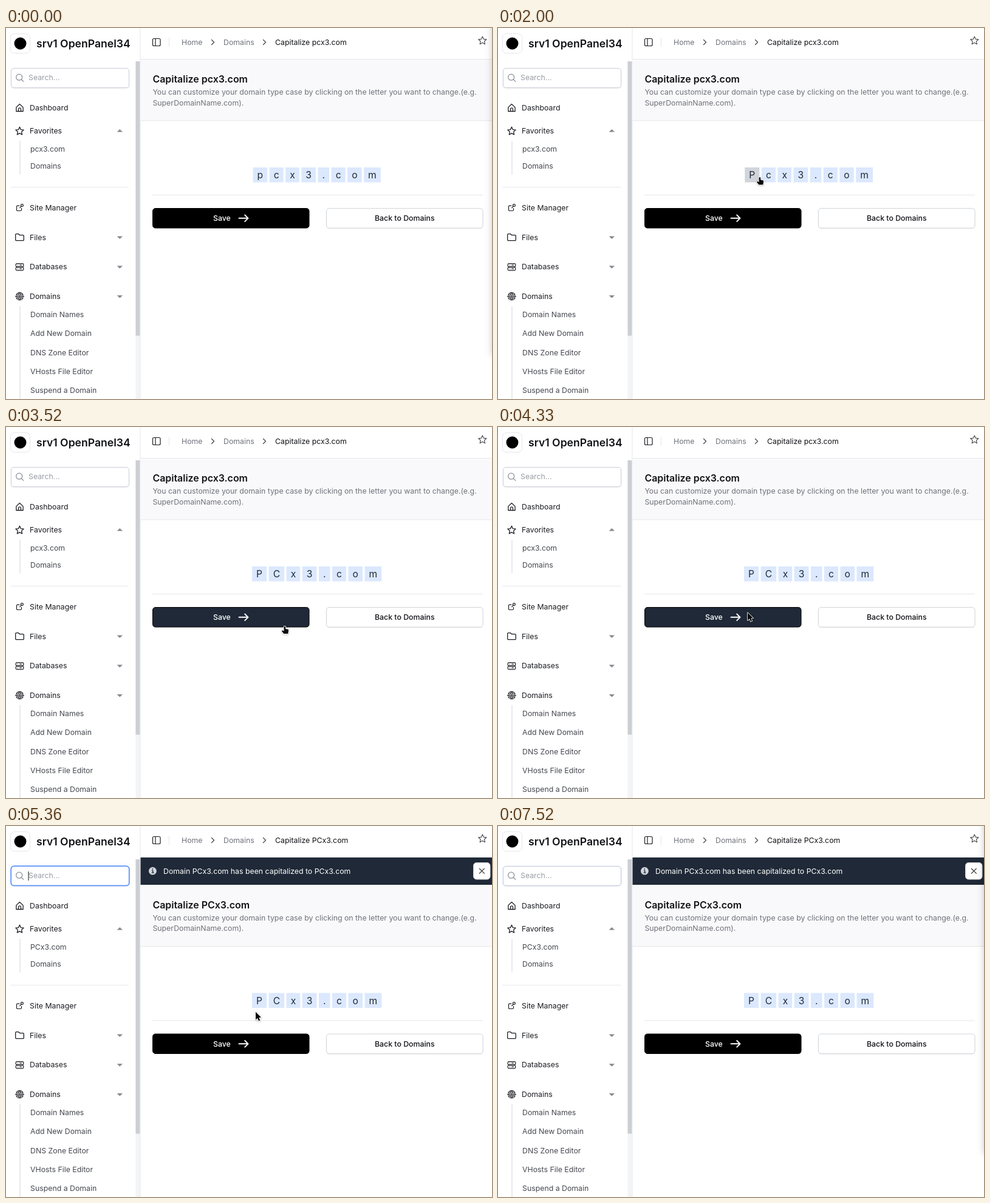
An HTML page with a canvas that plays this animation: 800x612 px, repeating every 7.55 s.

```html
<!DOCTYPE html>
<html lang="en">
<head>
<meta charset="utf-8">
<title>Capitalize domain</title>
<style>
html, body { margin: 0; width: 100%; height: 100%; overflow: hidden; background: #fff; }
canvas { display: block; width: 800px; height: 612px; }
</style>
</head>
<body>
<canvas id="stage"></canvas>
<script>
const LOOP = 7550, SAVED = 4910;
const INK = '#1f2937', DARK = '#1c1d22', SOFT = '#46484f', MUTED = '#6f727b', LINE = '#e5e7eb', EDGE = '#d1d5db';
const canvas = document.getElementById('stage');
const ctx = canvas.getContext('2d');
const ratio = window.devicePixelRatio || 1;
canvas.width = 800 * ratio;
canvas.height = 612 * ratio;

// cursor path: time, x, y
const PATH = [
  [30, 768, 585], [330, 690, 455], [640, 608, 345], [700, 575, 292], [790, 538, 279],
  [1030, 426, 269], [1260, 425, 256], [1500, 431, 246], [2060, 431, 246], [2210, 444, 246],
  [2450, 444, 246], [2700, 485, 278], [2910, 514, 313], [3120, 518, 367], [3220, 514, 369],
  [3500, 462, 330], [3850, 411, 306], [5660, 411, 307], [6100, 480, 306], [6420, 594, 305], [6670, 800, 303]
];

const clamp = v => Math.max(0, Math.min(1, v));
const ramp = (t, a, b) => clamp((t - a) / (b - a));

function cursorAt(t) {
  if (t < 30 || t >= 6670) return null;
  const i = PATH.findIndex(p => p[0] > t);
  const [t0, x0, y0] = PATH[i - 1], [t1, x1, y1] = PATH[i];
  const k = (t - t0) / (t1 - t0);
  return [x0 + (x1 - x0) * k, y0 + (y1 - y0) * k];
}

function text(s, x, y, color = DARK, size = 12.32, weight = 400) {
  ctx.font = `${weight} ${size}px Inter, sans-serif`;
  ctx.fillStyle = color;
  ctx.fillText(s, x, y);
}

function rect(x, y, w, h, color) {
  ctx.fillStyle = color;
  ctx.fillRect(x, y, w, h);
}

function box(x, y, w, h, r, fill, stroke, width = 1) {
  ctx.beginPath();
  ctx.roundRect(x, y, w, h, r);
  if (fill) { ctx.fillStyle = fill; ctx.fill(); }
  if (stroke) { ctx.strokeStyle = stroke; ctx.lineWidth = width; ctx.stroke(); }
}

function softBox(x, y, w, h, stroke) {
  ctx.save();
  ctx.shadowColor = 'rgba(0,0,0,.1)';
  ctx.shadowBlur = 2 * ratio;
  ctx.shadowOffsetY = ratio;
  box(x, y, w, h, 4.5, '#fff');
  ctx.restore();
  box(x, y, w, h, 4.5, '#fff', stroke);
}

function icon(d, x, y, color = DARK, width = 1.3, fill = false, scale = 1) {
  const p = new Path2D(d);
  ctx.save();
  ctx.translate(x, y);
  ctx.scale(scale, scale);
  ctx.lineWidth = width;
  ctx.lineCap = ctx.lineJoin = 'round';
  ctx.strokeStyle = ctx.fillStyle = color;
  if (fill) ctx.fill(p); else ctx.stroke(p);
  ctx.restore();
}

function starPath(r, inner) {
  let d = '';
  for (let i = 0; i < 10; i++) {
    const a = i * Math.PI / 5 - Math.PI / 2, q = i % 2 ? inner : r;
    d += (i ? 'L' : 'M') + q * Math.cos(a) + ' ' + q * Math.sin(a);
  }
  return d + 'Z';
}
const STAR = starPath(7, 3.3);
const ring = r => `M${-r} 0A${r} ${r} 0 1 1 ${r} 0A${r} ${r} 0 1 1 ${-r} 0Z`;
const DOWN = 'M-4.7 -2L4.7 -2L0 2.4Z', UP = 'M-4.7 2L4.7 2L0 -2.4Z';

function search(t) {
  const focus = t < SAVED ? 0 : 1 - ramp(t, 7400, 7530);
  softBox(8.5, 66.5, 194, 32, '#c9ced6');
  if (focus) {
    ctx.globalAlpha = focus;
    box(8.2, 66.2, 194.6, 32.2, 5, null, '#5b93f7', 1.8);
    ctx.globalAlpha = 1;
  }
  icon(ring(5), 21.7, 81.2, '#8f929b', 1.3);
  icon('M0 0L3.6 3.6', 25.3, 84.8, '#8f929b', 1.3);
  text('Search...', 37, 86.3, '#9a9da5');
  const caretOn = t < 5440 || (t >= 6040 && t < 6640) || t >= 7240;
  if (focus > 0.5 && caretOn) rect(36.5, 75, 1, 15, '#111');
}

function sidebar(t, name) {
  rect(213.5, 55, 7, 557, '#f3f4f6');
  rect(213.5, 55, 7, 452.5, '#cbced3');
  rect(220.5, 0, 1, 612, LINE);
  box(7.5, 9.5, 32, 32, 6, '#fff', LINE);
  icon(ring(10), 23.5, 25.5, '#000', 1, true);
  text('srv1 OpenPanel34', 50, 31.5, '#111216', 17.6, 600);
  search(t);

  text('Dashboard', 39, 136);
  icon('M-5.6 -.6L0 -6L5.6 -.6V6H-5.6ZM-2 6V2.4Q-2 .4 0 .4Q2 .4 2 2.4V6', 22.5, 131.5);
  text('Favorites', 39, 174.3);
  icon(STAR, 22.5, 170.3);
  icon(UP, 187.3, 169.5, '#858891', 1, true);
  rect(22.5, 186, 1, 55.5, EDGE);
  text(name, 40, 204, SOFT);
  text('Domains', 40, 231.8, SOFT);
  rect(8, 262, 194, 1, LINE);

  text('Site Manager', 39, 300.6);
  icon('M-.5 -3.2H-3.5Q-5 -3.2 -5 -1.7V3.7Q-5 5.2 -3.5 5.2H1.5Q3 5.2 3 3.7V1M.3 .2L2.8 -2.2', 22.5, 296.3, DARK, 1.2);
  icon(ring(1.9), 26.4, 292.6, DARK, 1.2);
  text('Files', 39, 349.5);
  icon('M-6.8 4V-4Q-6.8 -5.5 -5.3 -5.5H-1.8L0 -3.5H5.3Q6.8 -3.5 6.8 -2V4Q6.8 5.5 5.3 5.5H-5.3Q-6.8 5.5 -6.8 4Z', 22.5, 345.2);
  text('Databases', 39, 398.4);
  for (const y of [391.2, 397.2]) {
    box(16.2, y - 2.6, 12.6, 5.2, 1.8, null, DARK, 1.2);
    icon('M-3 0H-2.9M.2 0H3', 22.5, y, DARK, 1.2);
  }
  text('Domains', 39, 447);
  icon('M-5.6 -2.4A6.1 6.1 0 0 1 5.6 -2.4ZM-5.6 2.4A6.1 6.1 0 0 0 5.6 2.4ZM-2 -2.4Q-1.6 -5 0 -6Q1.6 -5 2 -2.4M-2 2.4Q-1.6 5 0 6Q1.6 5 2 2.4', 22.5, 442.7, DARK, 1.1);
  icon('M-6.5 0H-3.5M-1.5 0H1.5M3.5 0H6.5', 22.5, 442.7, DARK, 1.8);
  for (const y of [345.5, 394.3, 443]) icon(DOWN, 187.3, y, '#858891', 1, true);

  rect(22.5, 459, 1, 153, EDGE);
  ['Domain Names', 'Add New Domain', 'DNS Zone Editor', 'VHosts File Editor', 'Suspend a Domain']
    .forEach((s, i) => text(s, 40, 476.8 + i * 31.35, SOFT));
}

function topbar(name) {
  rect(221.5, 51, 578.5, 1, LINE);
  box(241.5, 17.5, 12.5, 12, 2, null, DARK, 1.2);
  icon('M0 -6V6', 246, 23.5, DARK, 1.2);
  rect(268, 16, 1, 15, LINE);
  text('Home', 289, 28, MUTED);
  text('Domains', 358, 28, MUTED);
  text('Capitalize ' + name, 443, 28, '#111216');
  for (const x of [340.5, 425.5]) icon('M-2 -4L2 0L-2 4', x, 23.5, SOFT, 1.3);
  icon(STAR, 784.3, 21, SOFT, 1.1);
}

function alertBar() {
  rect(221.5, 52, 578.5, 45, INK);
  icon(ring(6.4), 241.4, 74.2, EDGE, 1, true);
  icon('M-1 -.6H.3V3M-1.3 3H1.6', 241.4, 74.2, INK, 1.3);
  icon(ring(.9), 241.3, 71, INK, 1, true);
  text('Domain PCx3.com has been capitalized to PCx3.com', 259, 78.5, '#fff', 12.32, 400);
  box(769.5, 60.5, 27.5, 27.5, 5, '#fff', EDGE);
  icon('M-4 -4L4 4M4 -4L-4 4', 783.3, 74.2, SOFT, 1.3);
}

function tiles(t) {
  const word = t < 1850 ? 'pcx3.com' : t < 2390 ? 'Pcx3.com' : 'PCx3.com';
  const pad = 14.08, gap = 3.52, size = 15.6;
  const hover = t >= 1300 && t < 2090 ? 0 : t >= 2150 && t < 2520 ? 1 : -1;
  ctx.font = `400 ${size}px Inter, sans-serif`;
  const widths = [...word].map(c => ctx.measureText(c).width + pad);
  let x = 513.4 - widths.reduce((a, w) => a + w + gap, 0) / 2;
  widths.forEach((w, i) => {
    rect(x, 230, w, 24.6, i === hover ? EDGE : '#dbe8fd');
    text(word[i], x + pad / 2, 248, INK, size);
    x += w + gap;
  });
}

function page(t, name) {
  rect(221.5, 52, 578.5, 101, '#f9f9fb');
  rect(221.5, 152.5, 578.5, 1, LINE);
  text('Capitalize ' + name, 241.4, 90.4, '#111216', 15.95, 600);
  text('You can customize your domain type case by clicking on the letter you want to change.(e.g.', 241.4, 110.2, MUTED);
  text('SuperDomainName.com).', 241.4, 127.8, MUTED);
  tiles(t);
  rect(241, 275, 544, 1, LINE);

  const hot = t >= 3510 && t < SAVED;
  box(241.5, 297.5, 257.5, 32.5, 4.5, hot ? INK : '#000', '#000');
  text('Save', 341, 318, '#fff', 12.32, 500);
  icon('M-7.5 0H7.5M2.2 -5.3L7.5 0L2.2 5.3', 391, 313.8, '#fff', 1.9);
  softBox(527.5, 297.5, 257.5, 32.5, EDGE);
  text('Back to Domains', 607, 318, '#111216', 12.32, 500);
}

function sideShadow(t) {
  const a = t < 4000 ? 1 - ramp(t, 1540, 1710) : ramp(t, 7400, 7520);
  if (!a) return;
  ctx.save();
  ctx.globalAlpha = a;
  ctx.shadowColor = 'rgba(0,0,0,.25)';
  ctx.shadowBlur = 12 * ratio;
  rect(801, -20, 60, 560, '#000');
  ctx.restore();
}

const ARROW = 'M0 0V14.2L3.3 11.2L5.6 16.2L8 15.1L5.8 10.3L10 10Z';
const HAND = 'M-1.4 .8Q0 -.8 1.2 .8V4.4L5 5.2Q6.4 5.6 6.2 7.4L5.2 12.4H-1.6L-5 8.2Q-4.8 6.6 -3 7.2L-1.4 8.2Z';

function cursor(t) {
  const at = cursorAt(t);
  if (!at) return;
  const hand = (t >= 1300 && t < 2520) || (t >= 3510 && t < 4000);
  const shape = hand ? HAND : ARROW, scale = hand ? 1 : 0.9;
  ctx.save();
  ctx.shadowColor = 'rgba(0,0,0,.3)';
  ctx.shadowBlur = 3 * ratio;
  ctx.shadowOffsetY = ratio;
  icon(shape, ...at, '#fff', 1.8, false, scale);
  ctx.restore();
  icon(shape, ...at, '#0a0a0a', 1, true, scale);
}

function draw(t) {
  const saved = t >= SAVED, name = saved ? 'PCx3.com' : 'pcx3.com';
  ctx.setTransform(ratio, 0, 0, ratio, 0, 0);
  rect(0, 0, 800, 612, '#fff');
  sidebar(t, name);
  topbar(name);
  ctx.save();
  if (saved) ctx.translate(0, 45.5);
  page(t, name);
  ctx.restore();
  if (saved) alertBar();
  sideShadow(t);
  cursor(t);
}

const start = performance.now();
function tick() {
  draw((performance.now() - start) % LOOP);
  requestAnimationFrame(tick);
}
tick();
</script>
</body>
</html>
```
